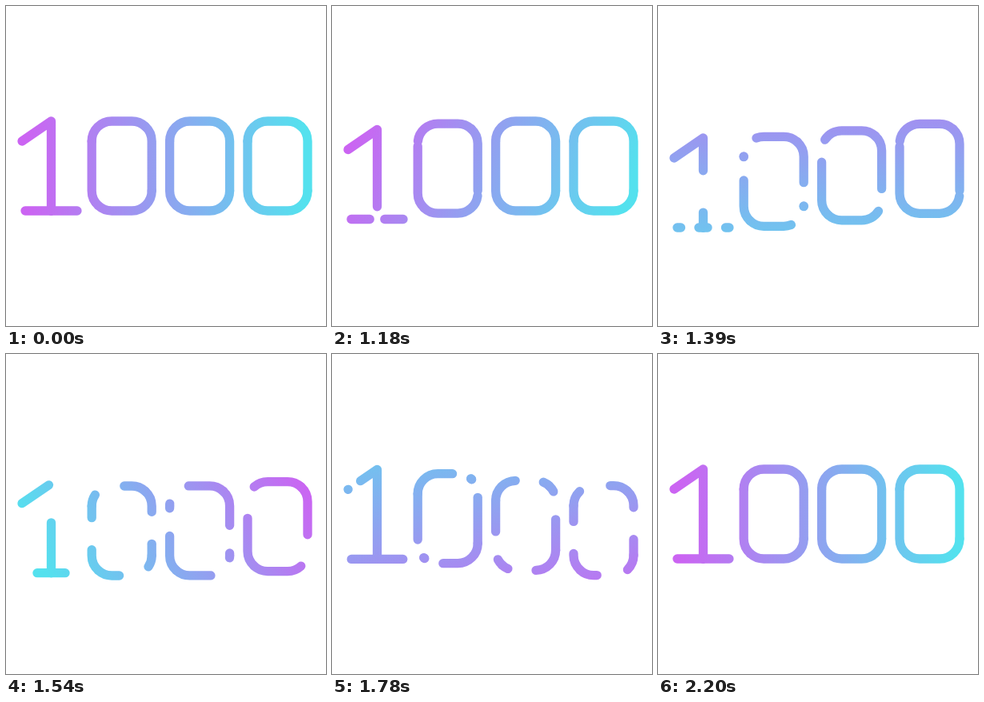
An HTML page with a canvas that plays this animation: 400x400 px, repeating every 2230 ms.

```html
<!DOCTYPE html>
<html lang="en">
<head>
<meta charset="utf-8">
<title>1000</title>
<style>
html, body { margin: 0; width: 100%; height: 100%; overflow: hidden; background: #fff; }
canvas { display: block; width: 400px; height: 400px; }
</style>
</head>
<body>
<canvas id="stage" width="400" height="400"></canvas>
<script>
const LOOP = 2230, HOLD = 1000, STEP = 30, STEPS = 40;
const ctx = document.getElementById('stage').getContext('2d');

// A line starts where its new stroke grows from; erase and redraw are [first, last] steps.
const line = (d, length, erase, redraw) => ({ path: new Path2D(d), length, erase, redraw });

const one = [
  line('M56.5 256V144L20 169', 156.2, [1, 26.5], [8, 31]),
  line('M56.5 256H24', 32.5, [0, 17], [8, 27]),
  line('M56.5 256H89', 32.5, [0, 17], [8, 27])
];

const zero = [
  'M107 169a25 25 0 0 1 25-25h25a25 25 0 0 1 25 25v62',
  'M107 169v62a25 25 0 0 0 25 25h25a25 25 0 0 0 25-25',
  'M182 231a25 25 0 0 1-25 25h-25a25 25 0 0 1-25-25v-62',
  'M182 231v-62a25 25 0 0 0-25-25h-25a25 25 0 0 0-25 25'
].map(d => line(d, 82.8, [0, 24.5], [9, 31]));

const digits = [
  { lines: one, x: 0, delay: 0 },
  { lines: zero, x: 0.2, delay: 3.1 },
  { lines: zero, x: 97.6, delay: 6.5 },
  { lines: zero, x: 195, delay: 10 }
];

function ease(step, [first, last]) {
  const u = Math.min(1, Math.max(0, (step - first) / (last - first)));
  return u * u * (3 - 2 * u);
}

function strokePart({ path, length }, from, to) {
  if (to <= from) return;
  ctx.setLineDash([(to - from) * length, 999]);
  ctx.lineDashOffset = -from * length;
  ctx.stroke(path);
}

function gradient(angle, offsetX, offsetY) {
  const x = 200 - offsetX, y = 192 - offsetY;
  const dx = 172 * Math.cos(angle), dy = 172 * Math.sin(angle);
  const g = ctx.createLinearGradient(x - dx, y - dy, x + dx, y + dy);
  g.addColorStop(0, '#cb64f2');
  g.addColorStop(1, '#54e1ee');
  return g;
}

function draw(step) {
  const angle = 2 * Math.PI * ease(step, [0, STEPS]);
  ctx.clearRect(0, 0, 400, 400);
  ctx.lineWidth = 11.3;
  ctx.lineCap = ctx.lineJoin = 'round';
  for (const { lines, x, delay } of digits) {
    const local = step - delay;
    const drop = 21 * (ease(local, [0, 12]) - ease(local, [15, 27]));
    ctx.save();
    ctx.translate(x, drop);
    ctx.strokeStyle = gradient(angle, x, drop);
    for (const part of lines) {
      const grown = step >= STEPS ? 1 : ease(local, part.redraw);
      strokePart(part, 0, grown);
      strokePart(part, ease(local, part.erase), 1);
    }
    ctx.restore();
  }
}

function tick() {
  const t = performance.now() % LOOP;
  draw(Math.max(0, Math.floor((t - HOLD) / STEP)));
  requestAnimationFrame(tick);
}
tick();
</script>
</body>
</html>
```
